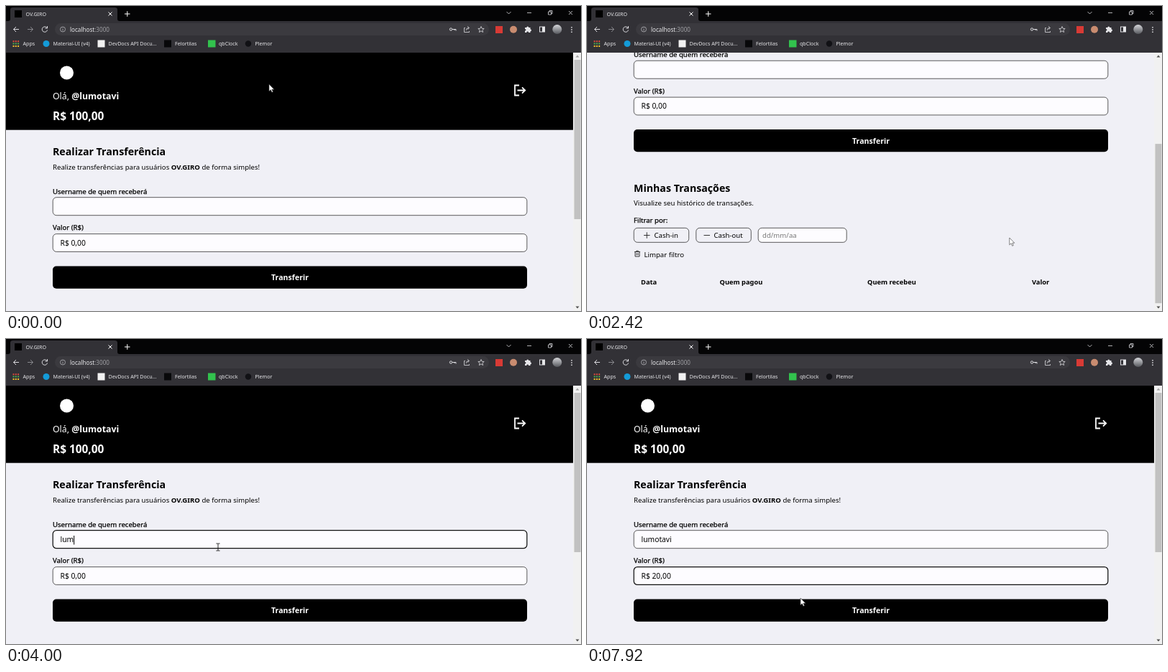
An HTML page for the animation above (8 s loop, 800 by 425 pixels).

```html
<!DOCTYPE html>
<html lang="pt-BR">
<head>
<meta charset="utf-8">
<title>Transferência</title>
<style>
  html, body { margin: 0; width: 100%; height: 100%; overflow: hidden; background: #f0f0f6; }
  svg { display: block; }
  text { font: 9.6px "Noto Sans", sans-serif; white-space: pre; }
  .h { font-size: 14.2px; font-weight: 700; }
  .hello { font-size: 12.3px; }
  .balance { font-size: 15.4px; font-weight: 700; }
  .b { font-weight: 700; }
  .m { stroke: #000; stroke-width: .25; }
  .input { font-size: 10.3px; }
  .ui { font-size: 7.1px; fill: #e6e6e9; }
  .line { fill: none; stroke: #dcdce0; stroke-width: 1; }
  .field { fill: #fdfcff; stroke: #333; stroke-width: .8; }
  .field.focus { stroke: #111; stroke-width: 1.25; }
  .chip { fill: #f0f0f6; stroke: #333; stroke-width: .8; }
  .icon { fill: none; stroke: #222; stroke-width: .9; }
  .head text { font-size: 9.3px; font-weight: 700; }
</style>
</head>
<body>
<svg width="800" height="425" viewBox="0 0 800 425">
  <!-- Browser window -->
  <path d="M0 0H800V65H0z" fill="#040405"/>
  <path d="M0 21H3Q6 21 6 18V5Q6 2 10 2H151Q155 2 155 5V18Q155 21 158 21H800V65H0z" fill="#323136"/>
  <rect x="68" y="24" width="604" height="17" rx="8.5" fill="#3b3a3f"/>
  <rect x="12" y="6" width="10" height="10" fill="#000"/>
  <text class="ui" x="27.5" y="13.5">OV.GIRO</text>
  <g class="line">
    <path d="M142.5 8.5l5 5m0-5l-5 5M165 11h7.5m-3.75-3.75v7.5" stroke="#fff"/>
    <path d="M696.5 8l3 3 3-3M725 9.5h6M754.5 8h4v4h-4zM756 8V6.5h4v4h-1.5M783 7l5 5m0-5l-5 5" stroke-width=".8"/>
    <path d="M18 32.5h-7.5m3.5-3.5l-3.5 3.5 3.5 3.5"/>
    <path d="M30 32.5h7.5m-3.5-3.5l3.5 3.5-3.5 3.5" stroke="#88888d"/>
    <path d="M57 30.5a3.7 3.7 0 1 0 .5 3M57.5 28v3h-3"/>
    <circle cx="79" cy="32.5" r="3.5" stroke="#b5b5ba" stroke-width=".8"/>
    <path d="M79 32v2.5m0-4v.8" stroke="#b5b5ba" stroke-width=".8"/>
    <circle cx="619" cy="32.5" r="1.7"/>
    <path d="M621 32.5h5v2m-2-2v1.5"/>
    <path d="M639 30.5h-1.5v6h7V35M640 34q0-3.5 4-3.5m-2-2.2l2.5 2.2-2.5 2.2" stroke-width=".8"/>
    <path d="M661 28.5l1.2 2.8 3 .2-2.3 2 .7 3-2.6-1.6-2.6 1.6.7-3-2.3-2 3-.2z" stroke-width=".8"/>
    <rect x="742.5" y="29" width="7" height="7"/>
  </g>
  <path d="M746 29h4v7h-4zM722 30h2.3a1.5 1.5 0 0 1 3 0h2.2v2.2a1.5 1.5 0 0 1 0 3V37h-2.4a1.4 1.4 0 0 0-2.8 0H722v-2.3a1.4 1.4 0 0 0 0-2.8z" fill="#e6e6e9"/>
  <rect x="681" y="28" width="10" height="10" fill="#d83a35"/>
  <circle cx="706" cy="32.8" r="5" fill="#c98c70"/>
  <linearGradient id="avatar" x2="0" y2="1"><stop stop-color="#d5d6da"/><stop offset="1" stop-color="#55575c"/></linearGradient>
  <circle cx="766.8" cy="32.5" r="6.5" fill="url(#avatar)"/>
  <path d="M787 29v8" stroke="#dcdce0" stroke-width="1.6" stroke-dasharray="1.6"/>
  <g stroke-width="2" stroke-dasharray="2 1.3">
    <path d="M9.5 49.3h9" stroke="#e0493d"/><path d="M9.5 52.6h9" stroke="#4caf50"/><path d="M9.5 55.9h9" stroke="#f2bd2c"/>
  </g>
  <circle cx="56" cy="52.5" r="4.5" fill="#149bd8"/>
  <rect x="127.5" y="47.5" width="10" height="10" fill="#f1f1f1"/>
  <rect x="220" y="47.5" width="10" height="10" fill="#08080a"/>
  <rect x="281" y="47.5" width="10.5" height="10" fill="#32c24d"/>
  <circle cx="337" cy="52.5" r="4.2" fill="#111115"/>
  <text class="ui" x="89" y="35.5" style="font-size:8.1px">localhost<tspan fill="#a0a0a5">:3000</tspan></text>
  <text class="ui" x="23.5" y="55">Apps</text>
  <text class="ui" x="65.5" y="55">Material-UI (v4)</text>
  <text class="ui" x="142.5" y="55">DevDocs API Docu...</text>
  <text class="ui" x="235" y="55">Felortilas</text>
  <text class="ui" x="296" y="55">qbClock</text>
  <text class="ui" x="346.5" y="55">Plemor</text>

  <!-- Page -->
  <svg y="65" width="790" height="360" viewBox="0 65 790 360">
    <rect y="65" width="790" height="360" fill="#f0f0f6"/>
    <g id="page">
      <rect y="65" width="790" height="107.7"/>
      <circle cx="84.5" cy="93" r="9.5" fill="#fff"/>
      <g fill="#fff">
        <text class="hello" x="65" y="130">Olá, <tspan class="b">@lumotavi</tspan></text>
        <text class="balance" x="65" y="159">R$ 100,00</text>
      </g>
      <path d="M714 110.5h-6v14h6M711.5 117.5h10.5M718 113.3l4.2 4.2-4.2 4.2" fill="none" stroke="#fff" stroke-width="1.8"/>

      <text class="h" x="65" y="208">Realizar Transferência</text>
      <text x="65" y="228">Realize transferências para usuários <tspan class="b">OV.GIRO</tspan> de forma simples!</text>
      <text class="m" x="65" y="261.5">Username de quem receberá</text>
      <rect id="userField" class="field" x="65.2" y="266.7" width="659.6" height="25" rx="5"/>
      <text id="user" class="input" x="75.5" y="283"></text>
      <text class="m" x="65" y="312">Valor (R$)</text>
      <rect id="valueField" class="field" x="65.2" y="317.6" width="659.6" height="24.8" rx="5"/>
      <text id="value" class="input" x="75.5" y="333.8"></text>
      <path id="caret" d="M0-9V3.5" stroke="#000"/>
      <rect x="65" y="362.5" width="660" height="31.3" rx="5"/>
      <text class="b" x="395" y="382" fill="#fff" text-anchor="middle" style="font-size:10.6px">Transferir</text>

      <text class="h" x="65" y="449">Minhas Transações</text>
      <text x="65" y="468">Visualize seu histórico de transações.</text>
      <text class="m" x="65" y="492">Filtrar por:</text>
      <g class="chip">
        <rect x="65.2" y="499.8" width="76.5" height="20" rx="5"/>
        <rect x="151.8" y="499.8" width="76.5" height="20" rx="5"/>
        <rect x="238.2" y="499.8" width="123" height="20" rx="5" fill="#fdfcff"/>
      </g>
      <path class="icon" d="M79 510h8.5m-4.25-4.25v8.5M162.5 510h8.5M66 533h8m-5.3 0v-1.3h2.6v1.3M67 533v6.5h6V533m-4 1.7v3m2-3v3"/>
      <text x="93.5" y="513.5">Cash-in</text>
      <text x="176.5" y="513.5">Cash-out</text>
      <text x="244" y="513.5" fill="#777">dd/mm/aa</text>
      <text x="79.5" y="540">Limpar filtro</text>
      <g class="head">
        <text x="75" y="578.5">Data</text>
        <text x="184.5" y="578.5">Quem pagou</text>
        <text x="390" y="578.5">Quem recebeu</text>
        <text x="619" y="578.5">Valor</text>
      </g>
    </g>
  </svg>

  <!-- Scrollbar -->
  <rect x="789" y="65" width="11" height="360" fill="#f1f1f1"/>
  <rect id="thumb" x="790.5" y="75" width="9" height="222" fill="#c1c1c1"/>
  <path id="upArrow" d="M792.5 71.5l2.5-3 2.5 3z"/>
  <path d="M792.5 418.5l2.5 3 2.5-3z" fill="#505050"/>

  <path id="arrow" d="M0 0V9.8L2.3 7.7 3.9 11.3 5.5 10.6 4 7.2H7z" fill="#fff" stroke="#333" stroke-width=".6"/>
  <path id="beam" d="M-2.5-5H-.7L0-4.5.7-5H2.5M0-4.5V4.5M-2.5 5H-.7L0 4.5.7 5H2.5" fill="none" stroke="#111" stroke-width=".9"/>
</svg>
<script>
const LOOP = 8000, STEP = 1000 / 12;
const el = id => document.getElementById(id);

// Keys are [time, ...values]
const scrollKeys = [[1920, 0], [2000, 66], [2083, 161], [2166, 186], [2250, 191],
  [2416, 191], [2500, 125], [2583, 43], [2666, 10], [2750, 0]];
const mouseKeys = [[83, 366, 109], [340, 420, 170], [500, 420, 170], [1000, 590, 320],
  [1500, 590, 320], [1916, 596, 330], [2083, 588, 323], [2416, 588, 323], [2583, 533, 320],
  [3083, 400, 316], [3500, 295, 290], [4916, 295, 290], [5583, 289, 351], [5750, 289, 351],
  [6000, 274, 337], [7580, 274, 337], [7916, 297, 361]];
const userTimes = [3750, 3833, 3916, 4666, 5000, 5166, 5333, 5416];
const valueTimes = [6333, 6666, 6916, 7166];
const values = ["0,00", "0,02", "0,20", "2,00", "20,00"];
const FOCUS_USER = 3500, FOCUS_VALUE = 5916;

function at(keys, t) {
  const i = keys.findIndex(k => k[0] > t);
  if (i < 0) return keys.at(-1).slice(1);
  if (!i) return keys[0].slice(1);
  const a = keys[i - 1], b = keys[i], p = (t - a[0]) / (b[0] - a[0]);
  return a.slice(1).map((v, j) => v + (b[j + 1] - v) * p);
}

const show = (node, on) => node.setAttribute("visibility", on ? "visible" : "hidden");
const move = (node, x, y) => node.setAttribute("transform", `translate(${x} ${y})`);

function draw(t) {
  const [scroll] = at(scrollKeys, t), [x, y] = at(mouseKeys, t);
  const past = times => times.filter(k => k <= t);
  move(el("page"), 0, -scroll);
  move(el("thumb"), 0, scroll * .615);
  el("upArrow").setAttribute("fill", scroll ? "#505050" : "#a3a3a3");

  el("user").textContent = "lumotavi".slice(0, past(userTimes).length);
  el("value").textContent = "R$ " + values[past(valueTimes).length];

  const onValue = t >= FOCUS_VALUE, onUser = t >= FOCUS_USER && !onValue;
  el("userField").classList.toggle("focus", onUser);
  el("valueField").classList.toggle("focus", onValue);

  const active = el(onValue ? "value" : "user");
  const lastKey = past([FOCUS_USER, ...userTimes, FOCUS_VALUE, ...valueTimes]).at(-1);
  move(el("caret"), 76 + active.getComputedTextLength(), active.getAttribute("y"));
  show(el("caret"), (onUser || onValue) && (t - lastKey) % 1060 < 530);

  const docY = y + scroll;
  const overField = x > 65 && x < 725 && (docY > 266 && docY < 292 || docY > 317 && docY < 343);
  for (const [id, on] of [["beam", overField], ["arrow", !overField]]) {
    move(el(id), x, y);
    show(el(id), on);
  }
}

function tick() {
  draw(Math.floor(performance.now() % LOOP / STEP + .01) * STEP);
  requestAnimationFrame(tick);
}
tick();
</script>
</body>
</html>
```
